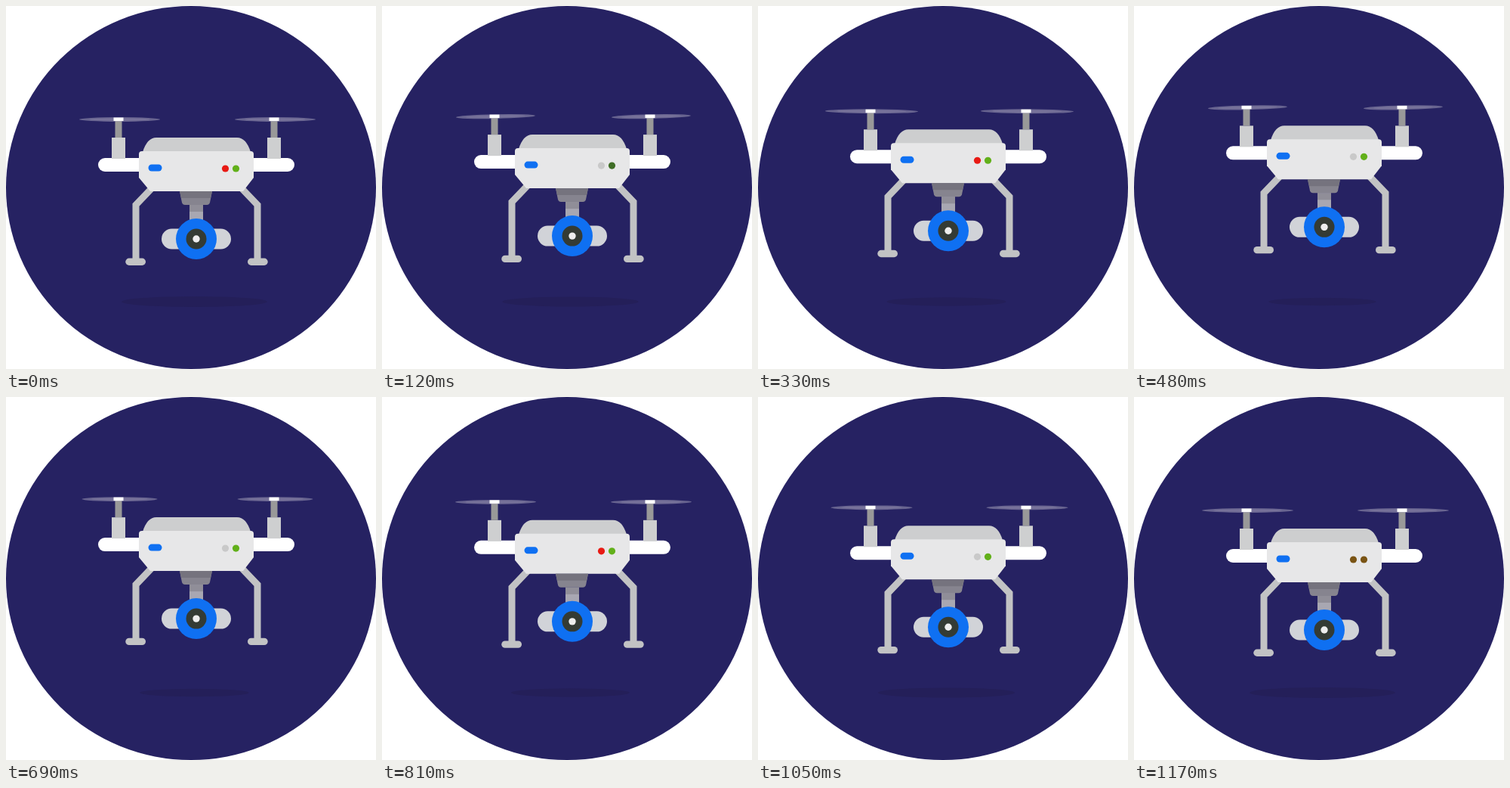
An HTML page that plays this animation: 490 by 480 pixels, repeating every 1200 ms.

```html
<!DOCTYPE html>
<html>
<head>
<meta charset="utf-8">
<title>Hovering drone</title>
<style>
  html, body { margin: 0; width: 100%; height: 100%; overflow: hidden; background: #fff; }
  svg { display: block; }
</style>
</head>
<body>
<svg width="490" height="480" viewBox="0 0 490 480">
  <defs>
    <g id="motor">
      <rect x="-9" y="174" width="18" height="28" fill="#cecfd0"/>
      <rect x="-4.5" y="151" width="9" height="23" fill="#999"/>
      <g class="blades">
        <ellipse rx="1" ry="2.9" fill="#a9a5bd" opacity=".5"/>
        <ellipse rx=".75" ry="1.7" fill="#8c88a8" opacity=".4"/>
      </g>
      <rect x="-6.5" y="147.5" width="13" height="4.5" fill="#fff"/>
    </g>
    <g id="leg" fill="none" stroke="#c2c3c4">
      <path d="M194 240L172 263V338" stroke-width="9"/>
      <path d="M163 338.3H180.300" stroke-width="9.400" stroke-linecap="round"/>
    </g>
  </defs>
  <ellipse cx="245" cy="240" rx="245" ry="240" fill="#262262"/>
  <ellipse id="shadow" rx="96.5" ry="7" fill="#241f59"/>
  <g id="drone">
    <rect x="122" y="201" width="260" height="18" rx="9" fill="#fff"/>
    <use href="#motor" x="149"/>
    <use href="#motor" x="355"/>
    <use href="#leg"/>
    <use href="#leg" transform="matrix(-1 0 0 1 505 0)"/>
    <path d="M181 193Q187 174 199 174H306Q318 174 324 193Z" fill="#cdcecf"/>
    <path d="M180 192H324q4 0 4 4V227L314 245H191L176 227V196q0-4 4-4Z" fill="#e7e7e8"/>
    <rect x="188.500" y="209.500" width="18" height="9" rx="4.500" fill="#0f70f2"/>
    <circle id="red" cx="290.500" cy="215" r="4.600"/>
    <circle id="green" cx="304.500" cy="215" r="4.600"/>
    <path d="M230 245H273L270 260q-1 3-4 3H237q-3 0-4-3Z" fill="#86848f"/>
    <path d="M230 245H273L271 254H232Z" fill="#75737e"/>
    <rect x="243" y="263" width="18" height="22" fill="#a8a7b2"/>
    <rect x="243" y="263" width="18" height="9" fill="#908e98"/>
    <rect x="206" y="294.500" width="92" height="27" rx="13.500" fill="#d1d3d8"/>
    <circle cx="252" cy="308" r="27" fill="#0f70f2"/>
    <circle cx="252" cy="308" r="13.500" fill="#343b34"/>
    <circle cx="252" cy="308" r="4.700" fill="#eee"/>
  </g>
</svg>
<script>
const LOOP = 1200, STEP = 30, SPIN = 400, PEAK = 570, LANDED = 1170, LIFT = 18.6;
const $ = selector => document.querySelector(selector);
const place = (selector, value) => $(selector).setAttribute('transform', value);
const fill = (selector, value) => $(selector).setAttribute('fill', value);

// Blade poses: time in the spin, half width, tilt in degrees
const poses = [
  [0, 53.5, 0], [80, 52.5, -1.2], [130, 52.5, -1.2], [210, 58, 0],
  [290, 50, 0], [330, 61.5, 0.3], [370, 60.5, 0], [400, 53.5, 0]
];

function bladePose(t) {
  const i = poses.findIndex(p => p[0] > t);
  const a = poses[i - 1], b = poses[i];
  const k = (t - a[0]) / (b[0] - a[0]);
  return a.map((v, j) => v + (b[j] - v) * k);
}

function lights(t) {
  if (t >= 350 && t < 390) return ['#7a5414', '#7a5414'];
  const red = t < 40 || t >= 310 ? '#e81a14' : '#c9c9c9';
  const green = t >= 105 && t < 250 ? '#3f6d26' : '#62b01a';
  return [red, green];
}

function draw(now) {
  const t = Math.floor(now % LOOP / STEP) * STEP;
  const spin = t % SPIN;
  const rise = LIFT * Math.max(0, Math.min(t / PEAK, (LANDED - t) / (LANDED - PEAK)));
  place('#drone', `translate(0 ${-rise})`);
  place('#shadow', `translate(249.5 391) scale(${1 - rise * 0.0168})`);

  const [, width, tilt] = bladePose(spin);
  place('.blades', `translate(1.5 150) rotate(${tilt}) scale(${width} 1)`);

  const [red, green] = lights(spin);
  fill('#red', red);
  fill('#green', green);
}

const start = performance.now();
(function tick() {
  draw(performance.now() - start);
  requestAnimationFrame(tick);
})();
</script>
</body>
</html>
```
